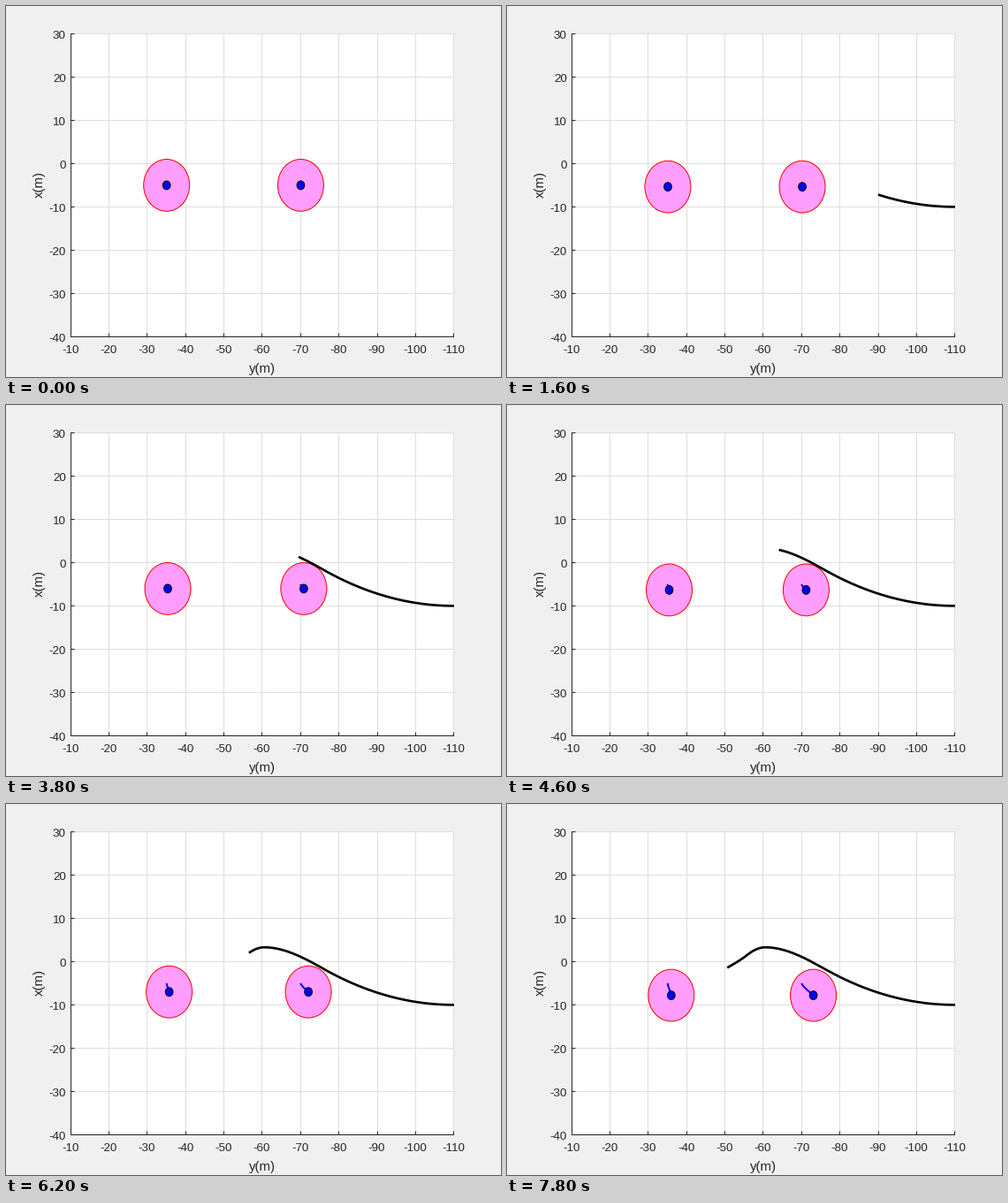
Animation, 560 px wide and 420 px high, one loop 8000 ms. Source, as a matplotlib script:

```python
import numpy as np
import matplotlib.pyplot as plt
from matplotlib.animation import FuncAnimation
from matplotlib.patches import Circle
from matplotlib.transforms import Affine2D

W, H, DPI = 560, 420, 80
PX = 72 / DPI  # points per pixel
FRAMES, INTERVAL = 40, 200
INK = "#262626"

plt.rcParams["font.family"] = "Liberation Sans"
plt.rcParams["axes.unicode_minus"] = False

# Bends of the vehicle's road: y, x, slope
KEY_Y, KEY_X, SLOPE = np.array([
    (-110, -10, 0), (-76, -1.7, 0.5), (-60.5, 3.3, 0),
    (-55.8, 1.55, -0.7), (-50.5, -1.45, -0.5),
]).T


def road(y):
    """Cubic Hermite curve through the bends."""
    i = np.clip(np.searchsorted(KEY_Y, y, side="right") - 1, 0, len(KEY_Y) - 2)
    h = KEY_Y[i + 1] - KEY_Y[i]
    u = (y - KEY_Y[i]) / h
    rise = u * u * (3 - 2 * u)
    return (KEY_X[i] * (1 - rise) + KEY_X[i + 1] * rise
            + h * u * (1 - u) * ((1 - u) * SLOPE[i] - u * SLOPE[i + 1]))


def vehicle(t):
    """Brakes evenly until step 31, then keeps a steady pace."""
    brake = np.minimum(t, 31)
    y = -110 + 2.78 * brake - 0.034 * brake ** 2 + 0.74 * (t - brake)
    return y, road(y)


def obstacle(t, start, a, b):
    """Drifting obstacle; a and b shape its sideways drift."""
    return start - t ** 2 * (a - b * t), -5 - 0.0367 * t - 0.0009 * t ** 2


fig = plt.figure(figsize=(W / DPI, H / DPI), dpi=DPI, facecolor="#f0f0f0")
ax = fig.add_axes([72.72 / W, 45.6 / H, 433.5 / W, 343 / H])
ax.set_xlim(-10, -110)
ax.set_ylim(-40, 30)
ax.set_xticks(range(-110, -9, 10))
ax.set_yticks(range(-40, 31, 10))
ax.set_axisbelow(True)
ax.grid(color="#dedede", lw=PX)
ax.tick_params(direction="in", length=4.3 * PX, width=PX, color=INK,
               labelcolor=INK, labelsize=13.33 * PX)
ax.tick_params(axis="x", pad=9.6 * PX)
ax.tick_params(axis="y", pad=5 * PX)
for side in ("top", "right"):
    ax.spines[side].set_visible(False)
for side in ("left", "bottom"):
    ax.spines[side].set(color=INK, linewidth=PX)
for line in ax.get_xgridlines() + ax.get_ygridlines():
    line.set_clip_on(False)
for text in ax.get_yticklabels():
    text.set_transform(text.get_transform() + Affine2D().translate(0, -1))

label = dict(color=INK, fontsize=15 * PX, ha="center", va="center")
fig.text(290.5 / W, 1 - 410.5 / H, "y(m)", **label)
fig.text(38 / W, 1 - 201.5 / H, "x(m)", rotation=90, **label)

# Grid lines snap to whole pixels; shapes sit on the pixel centres
centred = ax.transData + Affine2D().translate(0.6, 0)

DRIFT = [(-35, 0.00102, 0.0000102), (-70, 0.0024, 0.0000104)]
zones, dots, trails = [], [], []


def add_disc(radius, fill, edge, z):
    return ax.add_patch(Circle((0, 0), radius, fc=fill, ec=edge, lw=PX,
                               zorder=z, transform=centred))


def add_line(color, width, z):
    return ax.plot([], [], color=color, lw=width * PX, zorder=z, clip_on=False,
                   solid_capstyle="butt", transform=centred)[0]


for _ in DRIFT:
    zones.append(add_disc(6, "#ff9eff", "red", 3))
    trails.append(add_line("blue", 2, 4))
    dots.append(add_disc(1, "blue", "black", 5))
path = add_line("black", 2.67, 6)


def draw(n):
    t = np.linspace(0, n, 4 * n + 1)
    path.set_data(*vehicle(t))
    path.set_visible(n > 0)
    for drift, zone, dot, trail in zip(DRIFT, zones, dots, trails):
        y, x = obstacle(t, *drift)
        zone.center = dot.center = (y[-1], x[-1])
        trail.set_data(y, x)
    return [path, *zones, *dots, *trails]


anim = FuncAnimation(fig, draw, frames=FRAMES, interval=INTERVAL,
                     repeat=True, repeat_delay=0, init_func=lambda: draw(0))
plt.show()
```
